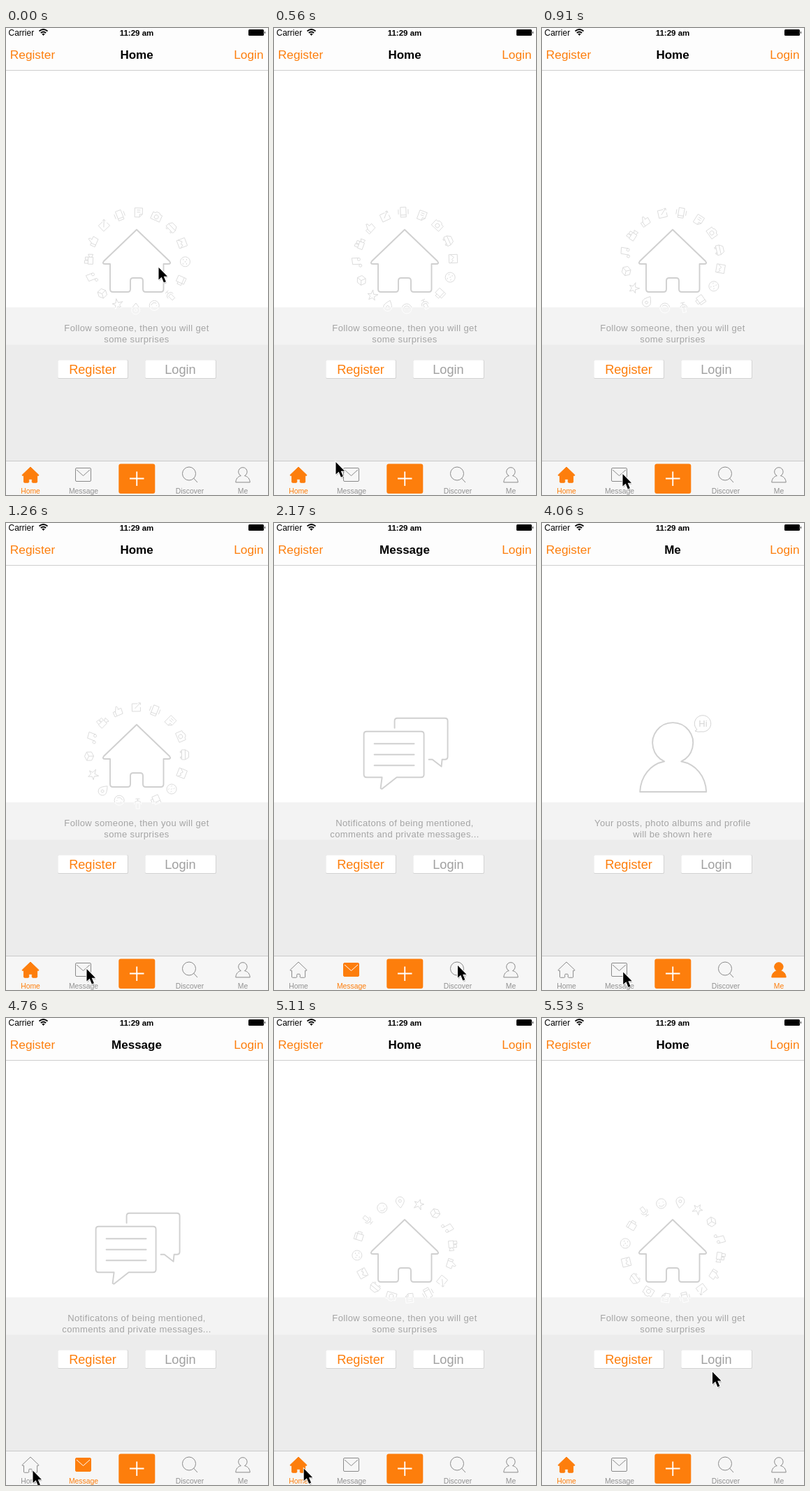
Write an HTML page that moves like this. It is 375x667 px and loops after 5.6 s.

```html
<!DOCTYPE html>
<html lang="en">
<head>
<meta charset="utf-8">
<title>Tab bar demo</title>
<style>
html, body { margin: 0; width: 100%; height: 100%; overflow: hidden; background: #fff; }
svg { display: block; width: 375px; height: 667px; font-family: "Liberation Sans", Arial, sans-serif; }
path, circle { vector-effect: non-scaling-stroke; }
.line { fill: none; stroke: #d0d0d0; stroke-width: 1.9; stroke-linejoin: round; stroke-linecap: round; }
.thin { fill: none; stroke-width: 1; stroke-linejoin: round; }
.mid { text-anchor: middle; }
.nav { font-size: 17.3px; fill: #fd7e0c; }
.title { font-size: 17px; font-weight: bold; }
.note { font-size: 13px; letter-spacing: .37px; fill: #a4a4a4; }
.button { font-size: 18.2px; }
.tab { fill: none; stroke: #8a8a8a; }
.tab text { font-size: 10.4px; fill: #929292; stroke: none; }
.tab.on { fill: #fd7e0c; stroke: #fd7e0c; }
.tab.on text { fill: #fd7e0c; }
.tab .flap { fill: none; }
.tab.on .flap { stroke: #fff; }
</style>
</head>
<body>
<svg viewBox="0 0 375 667">
  <defs>
    <path id="house" d="M187 288L234 333Q237 337 232 337H225.5V373Q225.500 377 221.500 377H200Q196 377 196 373V361Q196 357 192 357H182Q178 357 178 361V373Q178 377 174 377H153Q149 377 149 373V337H142Q137 337 140 333Z"/>
    <path id="person" d="M140 383.500C141 361 155 344 175 340A29 29 0 1 1 199 340C220 344 234 361 235 383.500Z"/>
    <g id="ring"></g>
    <clipPath id="upper"><path d="M0 0H375V399H0Z"/></clipPath>
    <clipPath id="lower"><path d="M0 399H375V452H0Z"/></clipPath>
  </defs>

  <path fill="#f3f3f3" d="M0 399H375V453H0Z"/>
  <path fill="#ececec" d="M0 452.500H375V618H0Z"/>
  <path fill="#fdfdfd" d="M0 0H375V60H0Z"/>
  <path fill="#cfcfcf" d="M0 60H375V61H0Z"/>
  <path fill="#f6f6f6" d="M0 618H375V667H0Z"/>
  <path fill="#cacaca" d="M0 618H375V619H0Z"/>

  <text x="3.500" y="10.500" font-size="12">Carrier</text>
  <g fill="none" stroke="#000" stroke-width="1.700">
    <path d="M47.500 4.500Q53.500 -.500 59.500 4.500M49.800 7Q53.500 4 57.200 7"/>
    <path fill="#000" stroke="none" d="M51.300 8.500Q53.500 6.800 55.700 8.500L53.500 11Z"/>
  </g>
  <text class="mid" x="187" y="10.500" font-size="11.500" font-weight="bold">11:29 am</text>
  <rect x="347" y="2" width="22" height="9" rx="1.500"/>
  <path d="M370 4.500Q372 6.500 370 8.500Z"/>

  <text class="nav" x="5.800" y="44">Register</text>
  <text class="nav" x="368.500" y="44" text-anchor="end">Login</text>

  <g fill="#d3d3d3">
    <rect x="74" y="474" width="101" height="27" rx="2"/>
    <rect x="199" y="474" width="102" height="27" rx="2"/>
    <g fill="#fff">
      <rect x="74.300" y="474.300" width="99.700" height="25.700" rx="1.500"/>
      <rect x="199.300" y="474.300" width="100.700" height="25.700" rx="1.500"/>
    </g>
  </g>
  <text class="button mid" x="124" y="494" fill="#fd7e0c">Register</text>
  <text class="button mid" x="249.500" y="494" fill="#a0a0a0">Login</text>

  <g id="Home">
    <use href="#ring" class="thin" stroke="#dcdcdc" clip-path="url(#upper)"/>
    <use href="#ring" class="thin" stroke="#fff" clip-path="url(#lower)"/>
    <use href="#house" class="line"/>
  </g>
  <g id="Chat" class="line" transform="translate(.6 .8)">
    <path d="M172 292V282Q172 278 176 278H244Q248 278 248 282V333Q248 337 244 337H240L239 347L226 337H221"/>
    <path d="M132 297H210Q214 297 214 301V358.500Q214 362.500 210 362.500H175L154 379L152 378L154 362.500H132Q128 362.500 128 358.500V301Q128 297 132 297ZM143 314.500H200M143 330H200M143 345.500H200"/>
  </g>
  <g id="Me">
    <use href="#person" class="line" transform="translate(.2 .5)"/>
    <path class="thin" stroke="#d3d3d3" d="M222 295A11.700 11.700 0 1 1 228 298Q223 299 219 297Q221 296 222 295Z"/>
    <text class="mid" x="230.500" y="291" font-size="13" fill="#d6d6d6">Hi</text>
  </g>
  <text id="title" class="title mid" x="187" y="44"></text>
  <text id="note1" class="note mid" x="187" y="433"></text>
  <text id="note2" class="note mid" x="187" y="448.500"></text>

  <g class="tab" id="tabHome">
    <use href="#house" transform="translate(35 627) scale(.25) translate(-187 -288)"/>
    <text class="mid" x="35" y="665">Home</text>
  </g>
  <g class="tab" id="tabMessage">
    <rect x="99.500" y="628.500" width="22" height="19" rx="1.500"/>
    <path class="flap" d="M101 631L110.500 639.500L120 631"/>
    <text class="mid" x="111" y="665">Message</text>
  </g>
  <g class="tab" id="tabDiscover">
    <circle cx="262" cy="636.500" r="9.500"/>
    <path d="M268.500 643L274 649"/>
    <text class="mid" x="263" y="665">Discover</text>
  </g>
  <g class="tab" id="tabMe">
    <use href="#person" transform="translate(339 627.500) scale(.215) translate(-187.500 -284)"/>
    <text class="mid" x="339" y="665">Me</text>
  </g>
  <rect x="161.300" y="622.500" width="52" height="42.500" rx="3" fill="#fd7e0c"/>
  <path d="M177 643.500H197.500M187.250 633.500V654" stroke="#fff" stroke-width="1.800"/>

  <g id="cursor">
    <path d="M0 0V17.500L4.200 13.700L7.400 21.500L10.400 20.200L7.200 12.700H12.500Z" transform="translate(1 2)" fill="#000" opacity=".2"/>
    <path d="M0 0V17.500L4.200 13.700L7.400 21.500L10.400 20.200L7.200 12.700H12.500Z" stroke="#fff" stroke-width="1.800" paint-order="stroke"/>
  </g>
</svg>
<script>
const LOOP = 5600, STEP = 70;
const $ = id => document.getElementById(id);

// Small icons, clockwise, each drawn around its own centre
const icons = [
  "M-4 -7H4V7H-4ZM-4 4H4M-7 -4V3M7 -4V3",                                  // phone
  "M-5 -6H6V3L2 7H-5ZM2 7V3H6M-2 -3H3M-2 0H3",                             // note
  "M-7 -4H-4L-2 -6H2L4 -4H7V6H-7ZM-3 1A3 3 0 1 0 3 1A3 3 0 1 0 -3 1",      // camera
  "M-7 0L-4 -5H4L7 0V5H-7ZM-7 0H7M-5 5V7H-3V5M3 5V7H5V5",                  // car
  "M-6 -6H6V6H-6ZM-6 4L-2 -1L1 2L3 0L6 4",                                 // picture
  "M-7 0A7 7 0 1 0 7 0A7 7 0 1 0 -7 0M-4 -2H-2M2 -2H4M-4 3H-2M2 3H4M-1 0H1", // film
  "M-5 -6H4V6H-5ZM4 -3H7V3H4M-5 -3H4",                                     // mug
  "M-2.5 -7H2.5V1H-2.5ZM-5 -1Q-5 4 0 4Q5 4 5 -1M0 4V7M-3 7H3",             // microphone
  "M-7 0A7 7 0 1 0 7 0A7 7 0 1 0 -7 0M-3 -2V-1M3 -2V-1M-4 2Q0 6 4 2",      // smiley
  "M0 8Q-6 1 -6 -2A6 6 0 0 1 6 -2Q6 1 0 8M-2 -2A2 2 0 1 0 2 -2A2 2 0 1 0 -2 -2", // pin
  "M0 -7L2 -2L7 -2L3 1L5 7L0 3L-5 7L-3 1L-7 -2L-2 -2Z",                    // star
  "M-6 -3L0 -6L6 -3V4L0 7L-6 4ZM-6 -3L0 0L6 -3M0 0V7",                     // box
  "M-3 5V-6L6 -7V3M-3 5A2 2 0 1 1 -7 5A2 2 0 1 1 -3 5M6 3A2 2 0 1 1 2 3A2 2 0 1 1 6 3", // music
  "M-7 -1H3V6H-7ZM3 1L7 -1V6L3 4M-6 -1V-6H-2V-1M-1 -1V-5H3V-1",            // video
  "M-7 -1H-4V6H-7ZM-4 0L0 -7Q3 -6 1 -2H6L5 6H-4",                         // thumb
  "M2 -5H-6V6H6V0M-2 2L6 -6M3 -6H6V-3"                                     // edit
];
$("ring").innerHTML = icons.map((d, i) =>
  `<path d="${d}" transform="rotate(${i * 360 / icons.length}) translate(0 -69)"/>`).join("");

const screens = {
  Home: ["Home", "Follow someone, then you will get", "some surprises"],
  Message: ["Chat", "Notificatons of being mentioned,", "comments and private messages..."],
  Discover: ["Chat", "The latest and hottest news are", "all here, never miss them"],
  Me: ["Me", "Your posts, photo albums and profile", "will be shown here"]
};
const visits = [[0, "Home"], [1330, "Message"], [2380, "Discover"], [3080, "Me"], [4270, "Message"], [4830, "Home"]];

const smooth = u => u * u * (3 - 2 * u);
const accelerate = u => u * u;
// time, x, y of the pointer tip, easing towards that point
const pointer = [
  [0, 218.5, 342], [560, 88.5, 620], [770, 115.5, 637],
  [1750, 115.5, 637], [2170, 263, 632],
  [2450, 263, 632], [2730, 341.5, 632],
  [3640, 341.5, 632], [4130, 103, 642],
  [4480, 103, 642], [4620, 38.5, 646.5],
  [5040, 38.5, 646.5], [5530, 244, 505.5, accelerate]
];

function pointerAt(t) {
  const i = pointer.findIndex(key => key[0] > t);
  if (i < 0) return pointer.at(-1).slice(1, 3);
  const [t0, x0, y0] = pointer[i - 1], [t1, x1, y1, ease = smooth] = pointer[i];
  const u = ease((t - t0) / (t1 - t0));
  return [x0 + (x1 - x0) * u, y0 + (y1 - y0) * u];
}

function show(name) {
  const [picture, line1, line2] = screens[name];
  for (const id of ["Home", "Chat", "Me"]) $(id).style.display = id === picture ? "" : "none";
  for (const tab in screens) $("tab" + tab).classList.toggle("on", tab === name);
  $("title").textContent = name;
  $("note1").textContent = line1;
  $("note2").textContent = line2;
}

let current;
function draw(now) {
  const t = Math.floor(now % LOOP / STEP) * STEP;
  const name = visits.findLast(([start]) => start <= t)[1];
  if (name !== current) show(current = name);
  $("ring").setAttribute("transform", `translate(187.5 332) rotate(${-21 + t * 0.0338})`);
  $("cursor").setAttribute("transform", `translate(${pointerAt(t)})`);
}

const start = performance.now();
function tick() {
  draw(performance.now() - start);
  requestAnimationFrame(tick);
}
tick();
</script>
</body>
</html>
```
